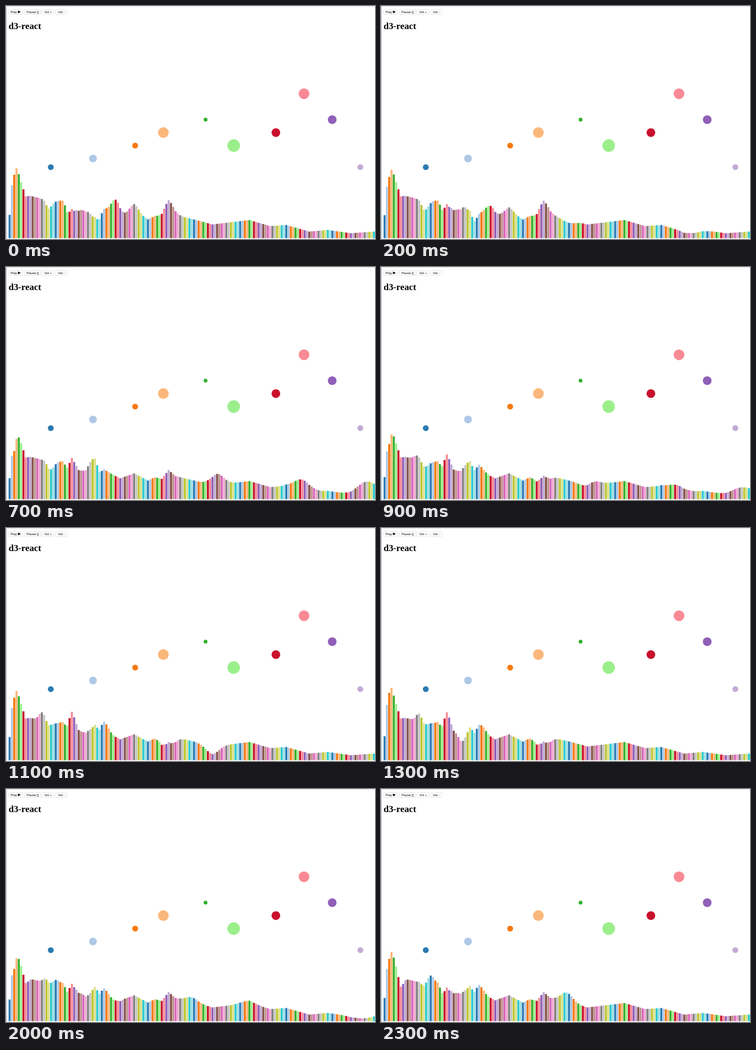
These frames come from a looping animation (669x424 px, 2400 ms). An HTML page:

```html
<!DOCTYPE html>
<html lang="en">
<head>
<meta charset="utf-8">
<title>d3-react</title>
<style>
  html, body { margin: 0; width: 100%; height: 100%; overflow: hidden; background: #fff; }
  svg { display: block; width: 669px; height: 424px; }
  .title { font: bold 16.7px "Liberation Serif", Times, serif; }
  .label { font: 6px "Liberation Sans", Arial, sans-serif; text-anchor: middle; }
</style>
</head>
<body>
<svg id="stage" viewBox="0 0 669 424">
  <rect width="669" height="424" fill="#fff"/>
  <rect width="669" height="1" fill="#dcdcdc"/>
  <rect y="1" width="1" height="423" fill="#a3b3c0"/>
  <text class="title" x="4.7" y="42">d3-react</text>
</svg>
<script>
const LOOP = 2400, STEP = 100, BARS = 159, PITCH = 4.18, FLOOR = 422.5;
const colors = ['#2a7bb2', '#aec8e6', '#f5790f', '#fbb77b', '#35b02e', '#9bef8b', '#c9112c',
  '#f88a95', '#905fb8', '#c1abd3', '#86514b', '#bf958f', '#d964bd', '#f0a8d0', '#808080',
  '#c6c6c6', '#bec62f', '#dce08c', '#2bcacf', '#9be0e5'];
const stage = document.getElementById('stage');

function add(tag, attrs, text) {
  const node = document.createElementNS('http://www.w3.org/2000/svg', tag);
  for (const key in attrs) node.setAttribute(key, attrs[key]);
  if (text) node.textContent = text;
  return stage.appendChild(node);
}

function button(x, width, text) {
  add('rect', { x, y: 6.3, width, height: 9.3, rx: 2, fill: '#fff', stroke: '#d2d2d2', 'stroke-width': .6 });
  return add('text', { class: 'label', x: x + width / 2, y: 13.1 }, text);
}
button(5, 25.5, 'Play').setAttribute('x', 14.2);
add('path', { d: 'M21.7 8.2L26.8 10.7L21.7 13.2Z' });
button(33.5, 29.5, 'Pause []');
button(65.5, 21.5, 'Vol +');
button(90, 20.5, 'Vol -');

[[81.2, 293.2, 5.3], [157.7, 277.5, 7], [234.2, 254, 5.3], [285.3, 230.3, 9.7], [361.8, 206.8, 3.5],
 [412.8, 254, 11.4], [489.3, 230.3, 7.9], [540.3, 159.7, 9.7], [591.4, 206.8, 7.9], [642.4, 293.2, 5.3]
].forEach(([cx, cy, r], i) => add('circle', { cx, cy, r, fill: colors[i] }));

const bars = Array.from({ length: BARS }, (_, i) =>
  add('rect', { x: (4.7 + i * PITCH).toFixed(2), width: 3.65, fill: colors[i % colors.length] }));

// Resting spectrum as bar, height pairs.
const envelope = [0,41, 1,90, 3,121, 4,115, 7,76, 9,77, 15,71, 17,63, 20,67, 23,69, 25,57, 27,75,
  30,53, 33,50, 37,63, 39,47, 41,54, 45,44, 48,38, 54,47, 60,34, 63,40, 66,37, 69,53, 72,42,
  80,34, 88,25, 104,33, 113,22, 120,24, 130,12, 138,15, 148,9, 158,12];

function envelopeAt(i) {
  let p = 0;
  while (envelope[p + 2] < i) p += 2;
  const [a, from, b, to] = envelope.slice(p, p + 4);
  return from + (to - from) * (i - a) / (b - a);
}

// Each beat lifts or lowers the spectrum around a few bars.
const spectra = [];
function beat(time, ...bumps) {
  const levels = bars.map((_, i) => bumps.reduce((sum, [center, lift]) =>
    sum + lift * Math.exp(-(((i - center) / (1.4 + center / 35)) ** 2)), envelopeAt(i)));
  spectra.push({ time, levels: levels.map(level => Math.max(0, level)) });
}
beat(0, [2, 10], [17, -9], [27, -22], [37, -24], [46, 28], [54, 15], [69, 16]);
beat(500, [18, -20], [35, 18], [40, -26], [69, 14], [80, -15], [134, -10]);
beat(700, [2, -18], [18, -10], [36, 13], [90, 20], [127, 20], [155, 21]);
beat(1100, [2, 8], [14, 15], [27, 13], [41, 16], [69, -20], [88, -14]);
beat(1300, [2, 17], [15, 14], [27, 12], [34, -18], [42, 12], [69, -19]);
beat(1700, [2, -29], [16, 17], [34, -12], [45, -10], [103, 9], [154, -11]);
beat(2300, [2, 8], [7, -13], [20, 16], [27, -14], [41, 12], [79, 17]);

function draw(ms) {
  const time = Math.floor(ms % LOOP / STEP) * STEP;
  const index = spectra.findLastIndex(s => s.time <= time);
  const from = spectra[index], to = spectra[(index + 1) % spectra.length];
  const mix = (time - from.time) / ((to.time || LOOP) - from.time);
  bars.forEach((bar, i) => {
    const height = from.levels[i] + (to.levels[i] - from.levels[i]) * mix;
    bar.setAttribute('y', (FLOOR - height).toFixed(2));
    bar.setAttribute('height', height.toFixed(2));
  });
}

const start = performance.now();
function tick() {
  draw(performance.now() - start);
  requestAnimationFrame(tick);
}
tick();
</script>
</body>
</html>
```
